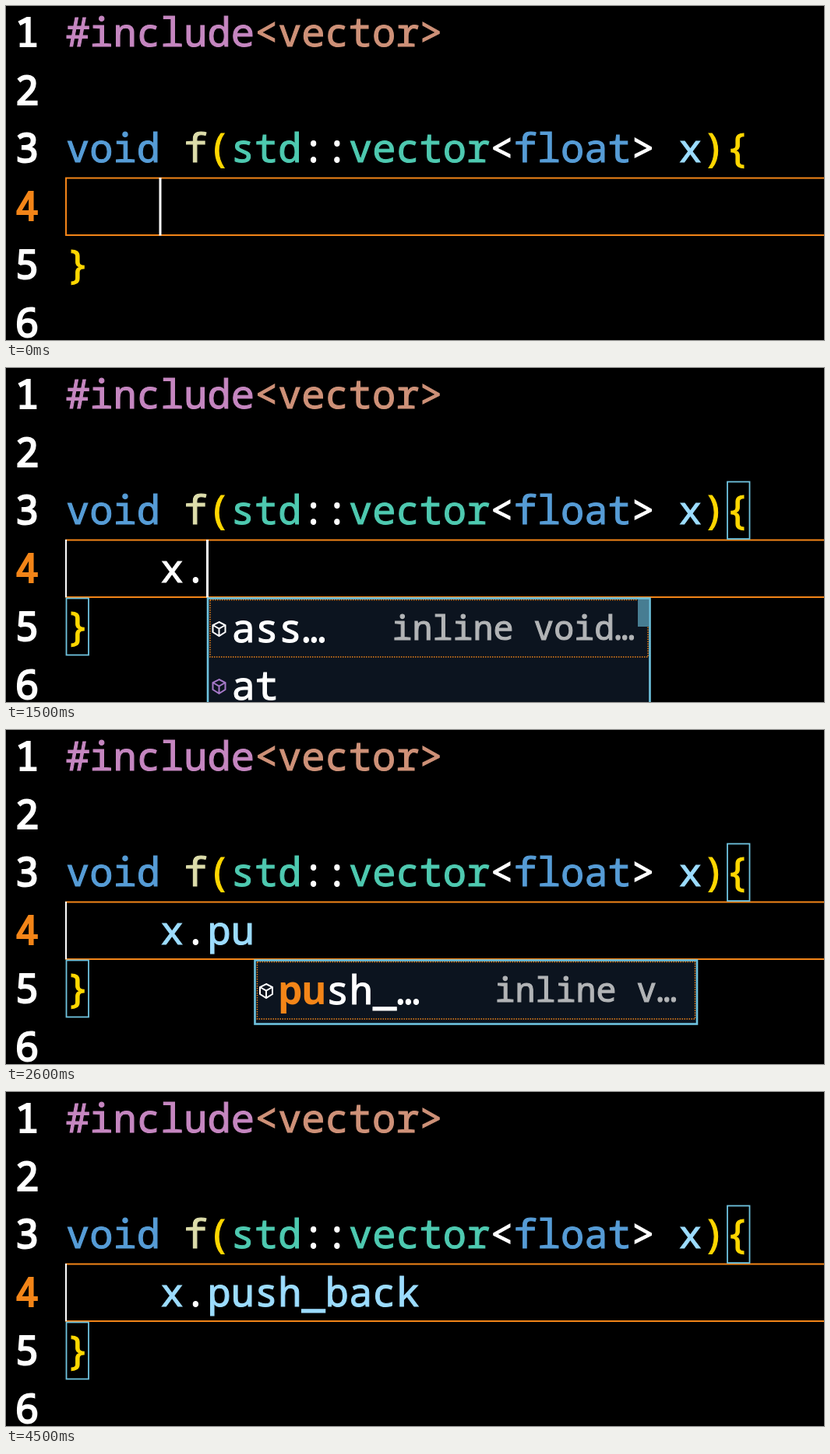
Recreate the animation shown at these times as an HTML page. Size 1050 by 430 pixels, loop 4700 ms.

```html
<!DOCTYPE html>
<html lang="en">
<head>
<meta charset="utf-8">
<title>Code completion</title>
<style>
  html, body { margin: 0; width: 100%; height: 100%; overflow: hidden; background: #000; }
  svg { display: block; width: 1050px; height: 430px; }
  text {
    font: 50.4px "Noto Sans Mono", "DejaVu Sans Mono", monospace; white-space: pre;
    color: #fff; stroke-width: 1.1px;
  }
  text, tspan { fill: currentColor; stroke: currentColor; }
  .num { text-anchor: middle; stroke-width: 2.2px; }
  .detail { font-size: 43.3px; color: #b2b4b6; }
  .hit { font-weight: 700; color: #f38518; stroke-width: 0; }
</style>
</head>
<body>
<svg viewBox="0 0 1050 430" xmlns="http://www.w3.org/2000/svg">
  <rect width="1050" height="430"/>
  <g id="code"></g>
  <g id="live"></g>
</svg>
<script>
const LOOP = 4700, LEFT = 77, CHAR = 30.25, LINE = 74.7;
const WHITE = '#ffffff', ORANGE = '#f38518', GOLD = '#ffd700', TEAL = '#4ec9b0';
const BLUE = '#569cd6', CYAN = '#9cdcfe', FRAME = '#6fc3df';

const baseline = n => 52 + (n - 1) * LINE;
const col = n => LEFT + n * CHAR;
const safe = s => s.replace(/</g, '&lt;').replace(/>/g, '&gt;');
const span = ([s, color]) => `<tspan style="color:${color}">${safe(s)}</tspan>`;
const text = (x, y, body, cls = '') => `<text x="${x}" y="${y}" class="${cls}">${body}</text>`;
const box = (x, y, w, h, stroke, sw = 2, more = '') =>
  `<rect x="${x}" y="${y}" width="${w}" height="${h}" fill="none" stroke="${stroke}" stroke-width="${sw}" ${more}/>`;
const bar = (x, y, w, h, fill) => `<rect x="${x}" y="${y}" width="${w}" height="${h}" fill="${fill}"/>`;
const path = (d, stroke, sw = 2) => `<path d="${d}" fill="none" stroke="${stroke}" stroke-width="${sw}"/>`;

const icons = {
  variable: (x, y) => path(`M${x - 6} ${y - 6}h-4v12h4M${x + 6} ${y - 6}h4v12h-4` +
    `M${x - 5} ${y}l5 -4l5 2v2l-5 4l-5 -2zM${x - 3} ${y}l6 -1`, WHITE),
  keyword: (x, y) => path(`M${x - 10} ${y - 8}h11M${x + 4} ${y - 8}h6M${x - 10} ${y - 2.5}h8M${x + 1} ${y - 2.5}h5` +
    `M${x - 10} ${y + 3}h13M${x + 6} ${y + 3}h4M${x - 10} ${y + 8.5}h18`, WHITE),
  method: (x, y, row) => path(`M${x} ${y - 9}l8 4v9l-8 5l-8 -5v-9zM${x - 8} ${y - 5}l8 4.5l8 -4.5M${x} ${y - 0.5}v9.5`,
    row ? '#a678c8' : WHITE)
};

// Each list: items are [icon, label]; detail belongs to the selected first row.
const lists = {
  'x': { items: [['variable', 'x'], ['keyword', 'xor']], detail: 'std::vector…', at: 218.5, hit: 1 },
  'x.': { items: [['method', 'ass…'], ['method', 'at']], detail: 'inline void…', at: 236.5, hit: 0, slider: true },
  'x.p': { items: [['method', 'pop_b…'], ['method', 'push_back']], detail: 'inline vo…', at: 290, hit: 1 },
  'x.pu': { items: [['method', 'push_…']], detail: 'inline v…', at: 308, hit: 2 }
};

// [start ms, typed text, list open]
const steps = [
  [0, '', false], [800, 'x', false], [900, 'x', true], [1300, 'x.', false], [1400, 'x.', true],
  [1700, 'x.p', true], [2000, 'x.pu', true], [2800, 'x.push_back', false]
];
const keys = [0, 800, 1300, 1700, 2000, 2800];
const lastBefore = (list, t, pick) => list.filter(v => pick(v) <= t).pop();

function drawCode() {
  const include = [['#include', '#c586c0'], ['<vector>', '#ce9178']];
  const signature = [['void', BLUE], [' ', WHITE], ['f', '#dcdcaa'], ['(', GOLD], ['std', TEAL], ['::', WHITE],
    ['vector', TEAL], ['<', WHITE], ['float', BLUE], ['> ', WHITE], ['x', CYAN], ['){', GOLD]];
  let out = '';
  for (let n = 1; n <= 6; n++) {
    out += text(27, baseline(n), span([String(n), n === 4 ? ORANGE : WHITE]), 'num');
  }
  out += text(LEFT, baseline(1), include.map(span).join(''));
  out += text(LEFT, baseline(3), signature.map(span).join(''));
  out += text(LEFT, baseline(5), span(['}', GOLD]));
  out += box(LEFT, 221.5, 1000, 73.5, ORANGE);
  document.getElementById('code').innerHTML = out;
}

function drawList(typed) {
  const { items, detail, at, hit, slider } = lists[typed];
  const x = col(4 + typed.length) + 0.5;
  const h = items.length > 1 ? 160 : 82;
  let out = bar(x, 296.5, 567.5, h, '#0c141f');
  out += box(x + 3, 298.5, 562, 73.5, ORANGE, 1.4, 'stroke-dasharray="1.5 1.5"');
  items.forEach(([icon, label], row) => {
    const shift = row * 74;
    out += icons[icon](x + 14.5, 336 + shift, row);
    out += text(x + 30.5, 353 + shift, `<tspan class="hit">${label.slice(0, hit)}</tspan>${label.slice(hit)}`);
  });
  out += text(x + at, 350, detail, 'detail');
  if (slider) out += bar(x + 552, 297, 14, 36, '#477d92');
  return out + box(x, 296.5, 567.5, h, FRAME, 2.6);
}

function drawLive(typed, open, cursor, matched) {
  let out = '';
  if (matched) {
    out += box(926, 146.5, 28.5, 73.5, FRAME, 1.8) + box(77.5, 296.5, 28.5, 73, FRAME, 1.8);
    out += bar(76, 221, 2, 74, WHITE);
  }
  const name = typed.length > 2 ? CYAN : WHITE;
  out += text(col(4), baseline(4),
    [[typed.slice(0, 1), name], [typed.slice(1, 2), WHITE], [typed.slice(2), name]].map(span).join(''));
  if (cursor) out += bar(col(4 + typed.length) - 1.5, 221, 3, 74.5, WHITE);
  if (open) out += drawList(typed);
  return out;
}

const live = document.getElementById('live');
let shown = '';
function frame(now) {
  const t = now % LOOP;
  const [, typed, open] = lastBefore(steps, t, s => s[0]);
  const sinceKey = t - lastBefore(keys, t, k => k);
  const cursor = sinceKey % 1000 < 500;
  const next = drawLive(typed, open, cursor, t >= 100);
  if (next !== shown) live.innerHTML = shown = next;
  requestAnimationFrame(frame);
}

drawCode();
frame(0);
</script>
</body>
</html>
```
